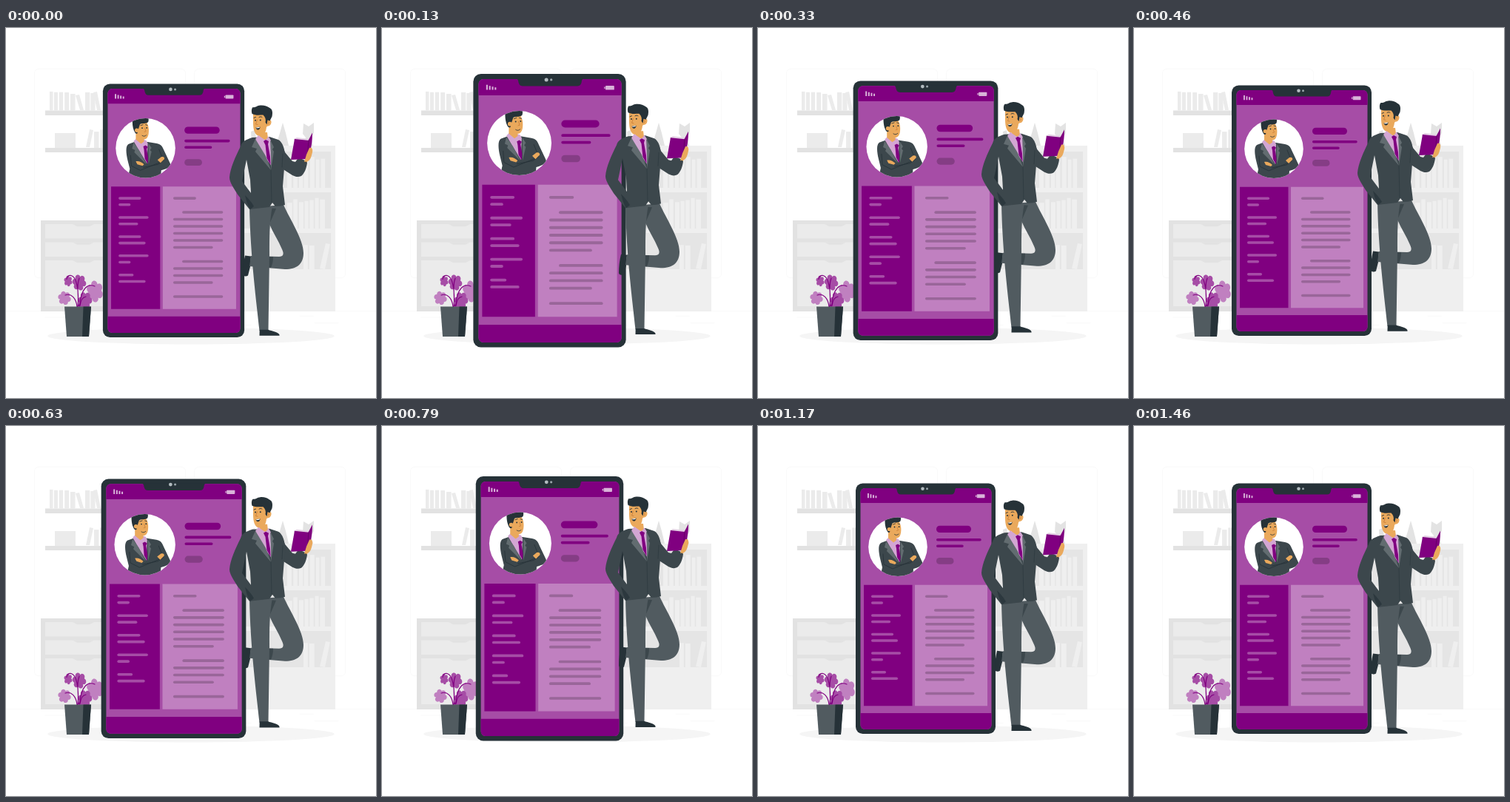
Animation, 500 px wide and 500 px high, one loop 1.5 s. Source, as an HTML page:

```html
<!DOCTYPE html>
<html lang="en">
<head>
<meta charset="utf-8">
<title>Profile on a phone</title>
<style>
html, body { margin: 0; width: 100%; height: 100%; overflow: hidden; background: #fff; }
svg { display: block; width: 100vw; height: 100vh; }
.ink { fill: #263238; }
.suit { fill: #3c474c; }
.pants { fill: #515b60; }
.lapel { fill: #626c70; }
.skin { fill: #eaa95c; }
.deep { fill: #800080; }
.mid { fill: #a64da6; }
.pale { fill: #c080c0; }
.shirt { fill: #d3a6d3; }
.line { fill: none; stroke-linecap: round; stroke-linejoin: round; }
</style>
</head>
<body>
<svg viewBox="0 0 500 500">
  <defs><clipPath id="disc"><circle cx="189" cy="163.2" r="39.8"/></clipPath></defs>

  <!-- room -->
  <g fill="none" stroke="#f2f2f2" stroke-width=".5">
    <rect x="38.5" y="55.2" width="204" height="282.5" rx="5.7"/>
    <rect x="254.7" y="55.2" width="204" height="282.5" rx="5.7"/>
    <path d="M0 382.5H500M416.8 398.6h33M396.6 389.3h19M322.5 401.3h9M52.5 391h43M104.5 391h6"/>
  </g>
  <path fill="#e2e2e2" d="M53 111.5h90v6.5h-90zM53 162h90v6h-90z"/>
  <path fill="#ebebeb" d="M66 142h28v20h-28zM94 91l5-1 6 21h-5zM118 87l5-1 5 25h-5zM108 161l5-24 5 1-5 23z"/>
  <path fill="#e2e2e2" d="M47 260h95v123h-95z"/>
  <g id="drawers"></g>

  <path fill="#efefef" d="M300 159h145v224h-145z"/>
  <g id="shelves"></g>
  <path fill="#efefef" d="M424 325l8-34 6 1-7 34z"/>
  <path fill="#e3e3e3" d="M374 128l4 14 4 17h-17l5-17zM331 140l5-2 4 21h-8z"/>
  <path fill="#e3e3e3" d="M402 129l7 4 7-5v14l-4 6 3 11h-13l3-11-4-5z"/>
  <g id="books" fill="#ebebeb"></g>
  <ellipse cx="250" cy="416.2" rx="193.9" ry="11.3" fill="#f5f5f5"/>

  <!-- plant -->
  <g id="leaves"></g>
  <path class="line" stroke="#800080" stroke-width="1.2" d="M97 378C99 352 95 336 88 334.500c-4-.5-6 2-6 5M98 376C97 352 96 346 99 338M99 376C102 350 111 345 120 349M100 377C101 366 104 364 108 363M96 377C95 365 88 358 80 361"/>
  <path class="pants" d="M79 376.500h36l-3 40.500h-30z"/>
  <path class="ink" d="M104.500 376.500h10.500l-3 40.500h-9z"/>

  <!-- phone -->
  <g id="phone">
    <rect class="ink" x="132" y="77.500" width="189" height="338.600" rx="9.500"/>
    <rect class="mid" x="138.500" y="84" width="177" height="326" rx="6"/>
    <path class="deep" d="M138.500 104V90a6 6 0 0 1 6-6h165a6 6 0 0 1 6 6v14zM138.500 388h177v16a6 6 0 0 1-6 6h-165a6 6 0 0 1-6-6z"/>
    <path class="ink" d="M184 83h85.500c-3 1-3 2-3.500 5-1 3-2 4.500-5 4.500h-68c-3 0-4-1.500-5-4.500-.500-3-.500-4-4-5z"/>
    <circle cx="222.500" cy="84.800" r="2.300" fill="#b3bcc0"/>
    <circle cx="228.500" cy="84.800" r="1.500" fill="#9aa5aa"/>
    <g fill="#d9b3d9">
      <path d="M148 91h1.900v6.200h-1.900zM151.500 92.300h1.900v4.900h-1.900zM155 93.300h1.900v3.900h-1.900zM158.500 94.200h1.900v3h-1.900z"/>
      <rect x="295.700" y="92.200" width="10.800" height="5" rx=".8"/>
      <rect x="294" y="93.500" width="1.200" height="2.400"/>
    </g>
    <circle cx="189" cy="163.200" r="39.800" fill="#fff"/>
    <g clip-path="url(#disc)">
      <path class="suit" d="M174 155l-8 3c-4 3-3 12-1 21l3 12-3 14h44l1-12c8-2 13-5 12-9l-9-19c-2-5-4-7-9-8l-12-2z"/>
      <path class="shirt" d="M173 154l5-5 12 4 2 4-1 27-11-18z"/>
      <g transform="translate(1 .5)">
        <path class="skin" d="M175 133l14-5c3 4 4 10 3 16-1 5-3 7-6 7l0 3-4 3-7-6z"/>
        <path class="ink" d="M170.500 128c-1-4 2-7 6-6 3-3 9-2 12-2 4 1 4 5 3 8-3 3-8 1-11 3l-2 6-2 3c2 3 0 4-2 3-3-4-4-10-4-15z"/>
        <circle class="skin" cx="176.300" cy="139" r="2.600"/>
        <path class="line" stroke="#263238" stroke-width=".8" d="M181.500 132.500l3-1M188 131.500l2.500.8M183.500 146c2 1.500 4 1 5.500-.5"/>
        <path class="line" stroke="#c77a35" stroke-width=".7" d="M187 136l1.500 4.500-2 .5"/>
        <circle class="ink" cx="183.500" cy="136" r=".9"/><circle class="ink" cx="189.600" cy="135.700" r=".9"/>
      </g>
      <path class="deep" d="M186 161l3-1.500 3 2-1.500 3 2 12-.5 8-4-7-1-12z"/>
      <path class="lapel" d="M173 156l-2 8 4 2-1 3 16 16-9-18zM193 157l4 6-2 3 2 2-4 17z"/>
      <path class="line" stroke="#263238" stroke-width=".8" d="M169 173l1 14 12 6 27-11M207 165l6 15-7 5-20 4"/>
      <path class="skin" d="M176 181c4-1 8 1 11 4l-2 2-7-2zM205 179l5-4c3-1 5 1 4 3l-5 5z"/>
    </g>
    <rect class="deep" x="241" y="134.700" width="47" height="9.300" rx="4.600"/>
    <path class="line" stroke="#800080" stroke-width="3.500" d="M242.700 153.700H300M242.700 162.300H276"/>
    <rect x="241" y="178" width="23.500" height="8.800" rx="4.400" fill="#853d85"/>
    <path class="deep" d="M143 214.700h65.500v163.500h-65.500z"/>
    <path class="pale" d="M212 214.700h98v163.500h-98z"/>
    <g id="rows" class="line" stroke-width="3.500"></g>
  </g>

  <!-- man -->
  <g id="man">
    <path class="ink" d="M331 308.500l-8-1c-2 8-3 17-3 25 0 3 4 4 7 2l3-12z"/>
    <path class="pants" d="M350 241l25-2C384 259 402 286 402 304c0 15-9 22-25 22l-48-4 2-14 38 1c6 0 7-4 4-10-5-12-12-22-17-34z"/>
    <path class="suit" d="M355 309h6c0 6-1 10-3 15l-4-.3zM356 265l9-21-13-1z"/>
    <path class="pants" d="M329 240l31 1c-4 20-4 42-4 65l-1.500 103h-12C339 375 330 308 329 240z"/>
    <path class="ink" d="M342.700 407.700h11.500c5 2 14 3 15.300 6.800v1.300h-27z"/>

    <path class="skin" d="M404 180l2-15 3-4 4 1c1 5 0 12-4 15l-3 6z"/>
    <path class="suit" d="M363 150c8 2 11 10 14 18l10 12 4 1 3-4c5-1 10 1 13 5-1 8-4 15-8 18-4 2-8 1-12-1l-17-11z"/>
    <path class="suit" fill-rule="evenodd" d="M333 148c-9 3-14 5-16 12-7 14-14 29-15 42 0 7 7 16 11 23l16 20 27-3 4-6 4 5c5 0 10-1 13-2l-3-25 2-25c3-14 1-33-8-38l-12-4zM325 178l5 27 1 18-12-16z"/>
    <path fill="#2c383e" d="M330 245l5-4c-4-7-8-11-12-15 2 8 3 12 7 19z"/>
    <path class="shirt" d="M337 151l6-5 12 1 3 5 1 35-10-14z"/>
    <path class="skin" d="M343 141h10l1 8-6 3-5-5z"/>
    <path class="skin" d="M334 114l17-3 4 13c4-1 5 5 1 8-2 1-3 0-4 2-1 9-5 13-10 12-6-1-8-9-8-18z"/>
    <path class="ink" d="M332.500 116c-1-3-1-7 1-9 4 1 5-2 10-2.500 5-.5 10 1 12 3 5 2 5 7 4 12l-3 6-3-1-1 6-2-3c1-4 0-7-3-10-5 0-10 1-15-1.500z"/>
    <path class="line" stroke="#263238" stroke-width=".9" d="M335 121.500l2.500-1M342 120.500c1.500-1 3-.8 4 0"/>
    <circle class="ink" cx="337" cy="124.800" r="1"/><circle class="ink" cx="343.800" cy="124.500" r="1"/>
    <path class="line" stroke="#c77a35" stroke-width=".8" d="M339.500 124l-2 6 2.500.5M354 126c1 0 1.500 2 .5 3.500"/>
    <path class="ink" d="M337.500 134.500l6-1c0 3-2 4.500-3.500 4s-2-1.500-2.500-3z"/>
    <path fill="#fff" d="M338 134.500l5-.8-.5 1.300-4 .5z"/>
    <path class="shirt" d="M337 150l4-5 10 7-6 5zM351 152l3-5 4 5-2 4z"/>
    <path class="deep" d="M348 153l3-2 4 2-1 4 3 17 .5 11-5-9-2-18z"/>
    <path class="lapel" d="M337 150l-5 11 7 2-2 4 21 25-7-19zM357 151l5 10-2 3 2 3-4 25 0-18z"/>
    <path class="line" stroke="#2c383e" stroke-width=".7" d="M358 192l1 44M374 170l-1 18"/>

    <path fill="#e3d0e3" d="M389 150l4-2 17 2 2-3-1 8-21-1z"/>
    <path class="deep" d="M390 150l19 2-2 25-22 1zM408.500 152l5.500-10.500c0 11-1 22-6.500 35.500z"/>
    <path class="line" stroke="#5c005c" stroke-width=".7" d="M409 152l-2 24"/>
    <path class="skin" d="M406 171l4-9c3-1 5 2 4 6s-2 10-6 12l-5 1z"/>
  </g>
</svg>
<script>
const $ = id => document.getElementById(id);
const add = (parent, tag, attrs) => {
  const el = document.createElementNS("http://www.w3.org/2000/svg", tag);
  for (const k in attrs) el.setAttribute(k, attrs[k]);
  $(parent).append(el);
};

let seed = 7;
const rand = (lo, hi) => {
  seed = seed * 16807 % 2147483647;
  return lo + (hi - lo) * seed / 2147483647;
};

// furniture
for (let i = 0; i < 3; i++) {
  const y = 265 + 24.5 * i;
  add("drawers", "path", { fill: "#ebebeb", d: `M53 ${y}h90v${i < 2 ? 19.5 : 62}h-90z` });
  add("drawers", "path", { fill: "#e2e2e2", d: `M90 ${y}h29l-6 3.200h-17z` });
  add("shelves", "path", { fill: "#e5e5e5", d: `M300 ${167 + 55 * i}h139v49h-139z` });
}

const books = (from, to, base, height, fill) => {
  for (let x = from, w; x < to; x += w + rand(1, 2.5)) {
    w = rand(4.5, 7);
    const h = height * rand(0.82, 1);
    add("books", "rect", { x, y: base - h, width: w, height: h, fill });
  }
};
books(59, 90, 111.5, 26, "#ebebeb");
books(107, 116, 111.5, 26, "#ebebeb");
books(119, 130, 162, 26, "#ebebeb");
books(380, 432, 216, 44, "#efefef");
books(380, 430, 271, 42, "#efefef");
books(402, 418, 326, 36, "#efefef");

// leaf: an ellipse with notched lobes
const leaf = (x, y, rx, ry, cls, turn) => {
  const pts = [];
  for (let a = 0; a < 6.28; a += 0.12) {
    const r = 0.68 + 0.36 * Math.sqrt(Math.abs(Math.sin(3 * a + turn)));
    pts.push([x + rx * r * Math.cos(a), y + ry * r * Math.sin(a)].map(v => v.toFixed(1)));
  }
  add("leaves", "polygon", { points: pts.join(" "), class: cls });
};
leaf(84, 342, 5.5, 7, "mid", 0.5);
leaf(99, 344, 9, 10.5, "mid", 1);
leaf(120, 356, 11, 14, "pale", 0.3);
leaf(79, 365, 8.500, 9, "pale", 0.8);
leaf(107, 368, 9, 11, "mid", 1.4);

// text on the phone
const row = (x, y, width, stroke) =>
  add("rows", "path", { d: `M${x + 1.7} ${y}h${width - 3.4}`, stroke });

[16, 26, 36, 16, 36].forEach((width, i) => {
  const y = 230.3 + 25.6 * i;
  row(153, y, i < 4 ? 30 + i % 2 * 10 : 20, "#a64da6");
  row(153, y + 8.6, width, "#a64da6");
});

// title, indented, full and short lines, by [indent, width]
const kinds = { t: [0, 30.5], i: [12, 54.5], f: [0, 66.5], s: [0, 53] };
[..."t iffffs iffs f"].forEach((kind, i) => {
  if (kind === " ") return;
  const [indent, width] = kinds[kind];
  row(226 + indent, 230.3 + 9.38 * i, width, "#996699");
});

const LOOP = 1500, STEPS = 36;

// 24 steps a second on a 10 ms clock
const stepTime = n => Math.round(n * LOOP / STEPS / 10) * 10;
const snap = t => {
  let n = Math.floor(t / LOOP * STEPS) + 1;
  while (stepTime(n) > t) n--;
  return stepTime(n);
};

// straight rise to a peak and straight fall
const pulse = (t, peak, rise, fall) =>
  Math.max(0, 1 - (t < peak ? (peak - t) / rise : (t - peak) / fall));

const draw = now => {
  const t = snap(now % LOOP);
  const beat = pulse(t, 130, 149, 327) + pulse(t, 725, 155, 165);
  $("phone").setAttribute("transform",
    `translate(226.5 246.8) scale(${1 + 0.0915 * beat}) translate(-226.5 -246.8)`);
  const phase = (t + 20) % LOOP / LOOP;
  const lift = 10 * (1 - Math.abs(1 - 2 * phase));
  $("man").setAttribute("transform", `translate(0 ${0.3 - lift})`);
};

const start = performance.now();
const tick = () => {
  draw(performance.now() - start);
  requestAnimationFrame(tick);
};
tick();
</script>
</body>
</html>
```
